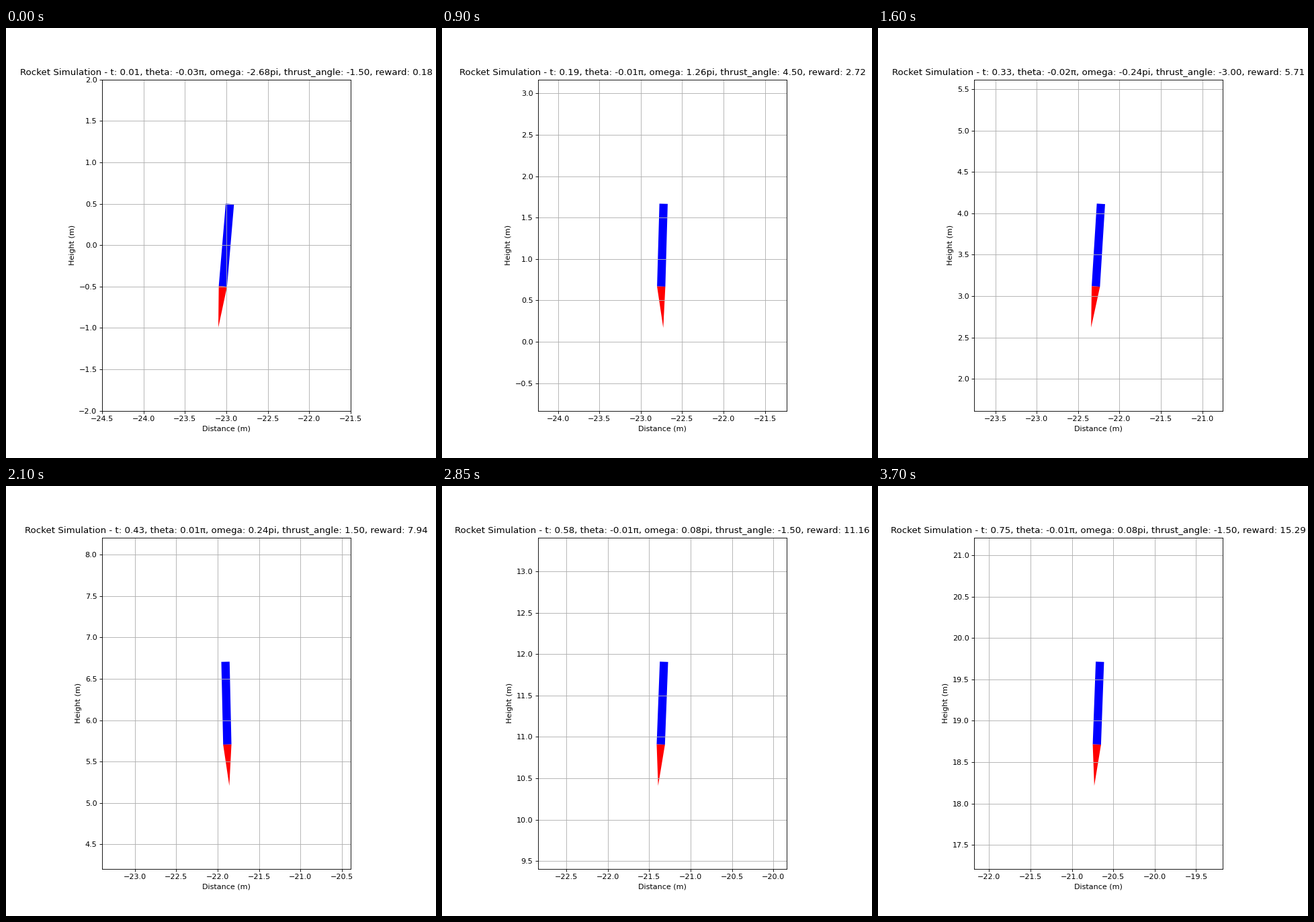
Write a matplotlib script that moves like this. It is 640x640 px and loops after 3750 ms.

```python
import numpy as np
import matplotlib.pyplot as plt
from matplotlib.animation import FuncAnimation

FRAMES, INTERVAL, DT = 75, 50, 0.01
LENGTH, WIDTH, FLAME = 1.0, 0.1, 0.5
THRUST, GRAVITY = 80.0, 9.81
SPIN = THRUST * 12 / (LENGTH**2 + WIDTH**2)
START = (-23.0, 0.0)
START_SPIN = -2.6825 * np.pi
GIMBAL_STEP = 1.5  # degrees

# (step, value) turning points; values in between are interpolated.
GIMBAL_KEYS = [(0, 0), (7, 7), (8, 7), (18, -3), (20.6, -3), (22, -4),
               (29.5, 1), (34.6, 2), (41.3, -1), (49, -1), (53, 1), (59, 1),
               (62, -1), (66, -1), (67, 0), (71, 0), (72, 1)]
REWARD_KEYS = [(1, 0.18), (9, 1.21), (19, 2.72), (33, 5.71),
               (43, 7.94), (58, 11.16), (75, 15.29)]


def at(keys, step):
    return np.interp(step, *zip(*keys))


def thrust_degrees(step):
    """The nozzle only turns in whole gimbal steps."""
    return GIMBAL_STEP * -int(np.rint(at(GIMBAL_KEYS, step)))


def simulate():
    """Return (x, y, theta, omega) after each step."""
    pos, vel = np.array(START), np.zeros(2)
    theta, omega = 0.0, START_SPIN
    states = []
    for step in range(FRAMES):
        gimbal = np.radians(thrust_degrees(step))
        lean = theta - gimbal
        pos = pos + vel * DT
        vel = vel + DT * np.array([-THRUST * np.sin(lean),
                                   THRUST * np.cos(lean) - GRAVITY])
        omega -= SPIN * np.sin(gimbal) * DT
        theta += omega * DT
        states.append((*pos, theta, omega))
    return states


def rotate(points, angle):
    c, s = np.cos(angle), np.sin(angle)
    return np.asarray(points) @ np.array([[c, s], [-s, c]])


STATES = simulate()
HALF_W, HALF_L = WIDTH / 2, LENGTH / 2
BODY = [(-HALF_W, -HALF_L), (HALF_W, -HALF_L), (HALF_W, HALF_L), (-HALF_W, HALF_L)]

fig, ax = plt.subplots(figsize=(8, 8), dpi=80)
ax.set_aspect("equal")
ax.grid(True)
ax.set_xlabel("Distance (m)")
ax.set_ylabel("Height (m)")
body, = ax.fill(*np.zeros((2, 4)), facecolor="blue")
flame, = ax.fill(*np.zeros((2, 3)), facecolor="red")
title = ax.set_title("")


def draw(i):
    step = i + 1
    x, y, theta, omega = STATES[i]
    thrust_angle = thrust_degrees(step)
    hull = rotate(BODY, theta) + (x, y)
    nozzle = hull[:2].mean(axis=0)
    tip = nozzle + rotate([0, -FLAME], theta + np.radians(thrust_angle))
    body.set_xy(hull)
    flame.set_xy([hull[0], hull[1], tip])
    # The camera stays centred on the rocket.
    ax.set_xlim(x - 1.5, x + 1.5)
    ax.set_ylim(y - 2, y + 2)
    title.set_text(
        f"Rocket Simulation - t: {step * DT:.2f}, theta: {theta / np.pi:.2f}π, "
        f"omega: {omega / np.pi:.2f}pi, thrust_angle: {thrust_angle:.2f}, "
        f"reward: {at(REWARD_KEYS, step):.2f}")
    return body, flame, title


anim = FuncAnimation(fig, draw, frames=FRAMES, interval=INTERVAL, repeat=True,
                     repeat_delay=0, blit=False)
plt.show()
```
